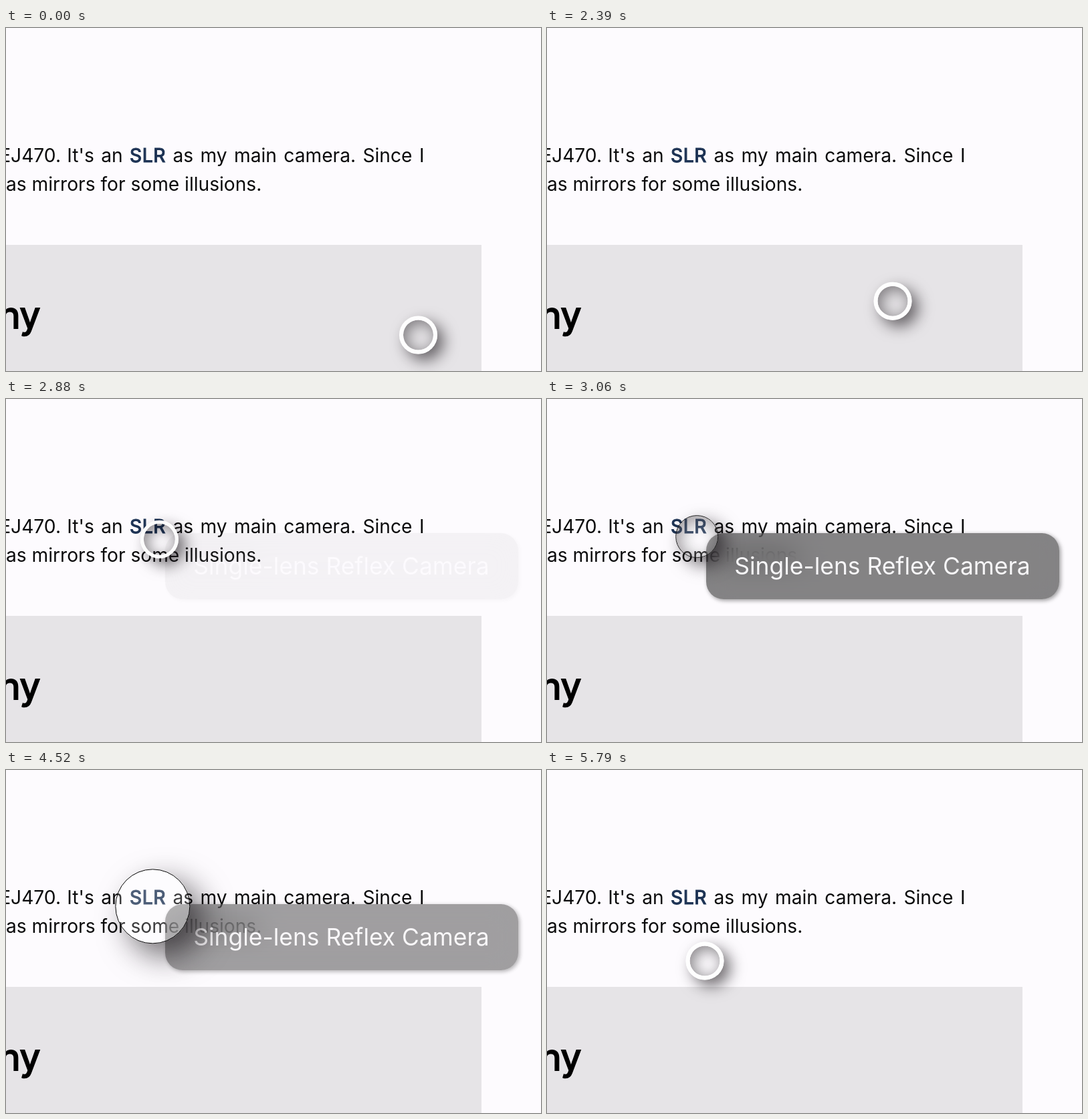
An HTML page for the animation above (6610 ms loop, 800 by 514 pixels).

```html
<!DOCTYPE html>
<html lang="en">
<head>
<meta charset="utf-8">
<title>Hover cursor</title>
<style>
  html, body { margin: 0; width: 100%; height: 100%; overflow: hidden; background: #fdfbfe; }
  body { position: relative; font-family: Inter, sans-serif; color: #0a0a0b; }
  div { position: absolute; box-sizing: border-box; white-space: nowrap; }
  .line { font-size: 28.15px; line-height: 42px; }
  #lead { right: calc(100% - 82px); top: 170px; }
  #rest { left: 91.3px; top: 170px; width: 534.2px; text-align-last: justify; white-space: normal; }
  #next { left: 0; top: 213px; }
  #rest span { color: #1d3354; letter-spacing: .6px; -webkit-text-stroke: 1.2px #1d3354; }
  #panel { left: 0; top: 325px; width: 710.5px; height: 189px; background: #e6e4e7; overflow: hidden; }
  #panel svg { display: block; }
  #panel text { font-size: 54px; stroke: #000; stroke-width: 2.2px; }
  #tip {
    left: 237.5px; top: 200.5px; width: 528px; height: 99px; border-radius: 26px;
    background: rgba(0, 0, 0, .48); backdrop-filter: blur(20px);
    box-shadow: 2px 2px 6px rgba(0, 0, 0, .4);
    color: #f7f6f8; font-size: 35.4px; line-height: 99px; text-align: center;
  }
  #dot { left: 0; top: 0; border-radius: 50%; border-style: solid; }
</style>
</head>
<body>
<div class="line" id="lead">EJ470.</div>
<div class="line" id="rest">It's an <span>SLR</span> as my main camera. Since I</div>
<div class="line" id="next">as mirrors for some illusions.</div>
<div id="panel">
  <svg width="710" height="189"><text x="51" y="125" text-anchor="end">Photography</text></svg>
</div>
<div id="tip">Single-lens Reflex Camera</div>
<div id="dot"></div>
<script>
const LOOP = 6610;
const tip = document.getElementById('tip');
const dot = document.getElementById('dot');

const mix = (a, b, u) => a + (b - a) * u;
const ramp = (t, from, to) => Math.min(1, Math.max(0, (t - from) / (to - from)));
const smooth = u => u * u * (3 - 2 * u);
const cubic = u => u < .5 ? 4 * u ** 3 : 1 - 4 * (1 - u) ** 3;
const easeOut = u => 1 - (1 - u) ** 2;
const glide = u => 1 - (1 - u) ** 3 * (1 + 3 * u);

// Three moves: a curved approach, a nudge onto the link, the way down.
function place(t) {
  const near = glide(ramp(t, 2190, 3010));
  const nudge = smooth(ramp(t, 3040, 3420));
  const away = smooth(ramp(t, 4400, 4970));
  return [
    mix(616.5, 224, near) - 5.5 * nudge + 17.5 * away ** 1.5,
    mix(460, 206, near) + 19 * Math.sin(Math.PI * near) - 12.5 * nudge + 92.5 * away
  ];
}

function draw(t) {
  const [x, y] = place(t);
  const shrink = easeOut(ramp(t, 4520, 4940));
  const grown = cubic(ramp(t, 2900, 3420)) * (1 - shrink);
  const clear = easeOut(ramp(t, 2880, 3200)) * (1 - shrink);
  const shown = ramp(t, 2870, 3020) * (1 - ramp(t, 4490, 4630));

  const r = mix(28.5, 56, grown);
  const grey = 254 * (1 - clear) ** 1.4;
  const off = r * .34, blur = r * .8, dip = r * .16 * (1 - grown);
  const s = dot.style;
  s.width = s.height = 2 * r + 'px';
  s.transform = `translate(${x - r}px, ${y - r}px)`;
  s.borderWidth = 6 * (1 - clear) + 'px';
  s.borderColor = `rgb(${grey}, ${grey}, ${grey})`;
  s.backgroundColor = `rgba(255, 255, 255, ${.21 * clear})`;
  s.boxShadow = `${off}px ${off}px ${blur}px rgba(20, 15, 20, .6), `
    + `inset ${dip}px ${dip}px ${blur}px rgba(20, 15, 20, ${.5 * (1 - grown)})`;
  tip.style.opacity = shown;
  tip.style.visibility = shown > 0 ? 'visible' : 'hidden';
}

const start = performance.now();
function tick() {
  draw((performance.now() - start) % LOOP);
  requestAnimationFrame(tick);
}
tick();
</script>
</body>
</html>
```
